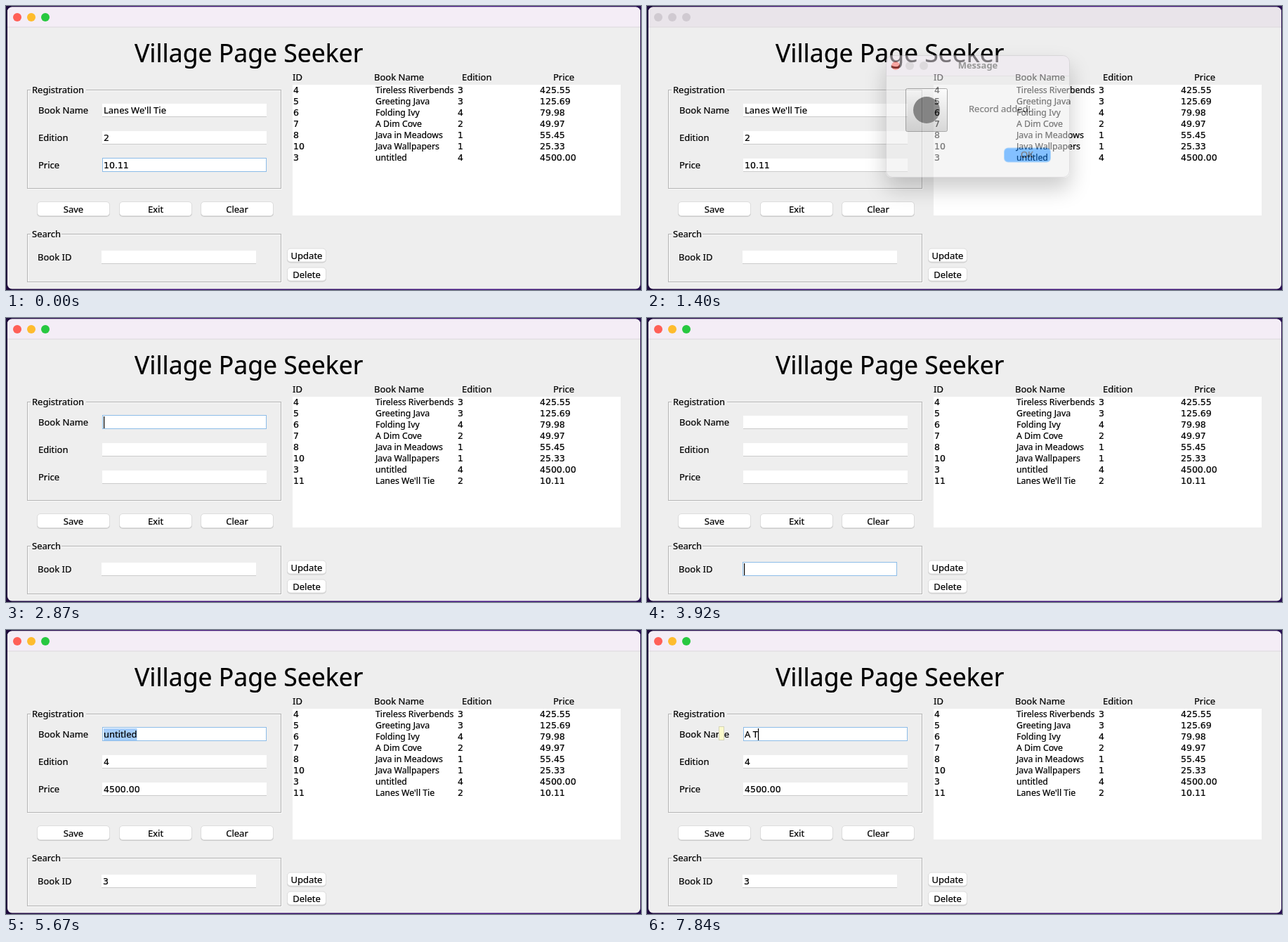
These frames come from a looping animation (904 by 404 pixels, 8000 ms). An HTML page:

```html
<!DOCTYPE html>
<html lang="en">
<head>
<meta charset="utf-8">
<title>Book registration</title>
<style>
  html, body { margin: 0; width: 100%; height: 100%; overflow: hidden; background: #241047; }
  svg { display: block; width: 904px; height: 404px; }
  text { font: 13px "Noto Sans", "Open Sans", sans-serif; white-space: pre; stroke: #000; stroke-width: .22px; }
  .num { font: 12.5px "DejaVu Sans", sans-serif; }
  .cell { font-size: 12.3px; }
  .mid { text-anchor: middle; }
  .title { font-size: 35.5px; }
  .bold { font-weight: bold; fill: #444; stroke: none; }
</style>
</head>
<body>
<svg id="stage" viewBox="0 0 904 404" xmlns="http://www.w3.org/2000/svg"></svg>
<script>
const LOOP = 8000, BLINK = 490;
const NEW_BOOK = "Lanes We'll Tie";
const books = [
  [4, "Tireless Riverbends", 3, "425.55"],
  [5, "Greeting Java", 3, "125.69"],
  [6, "Folding Ivy", 4, "79.98"],
  [7, "A Dim Cove", 2, "49.97"],
  [8, "Java in Meadows", 1, "55.45"],
  [10, "Java Wallpapers", 1, "25.33"],
  [3, "untitled", 4, "4500.00"],
  [11, NEW_BOOK, 2, "10.11"],
];
const fields = {
  name: { x: 137, y: 138, w: 234 },
  edition: { x: 137, y: 177, w: 234 },
  price: { x: 137, y: 216, w: 234 },
  id: { x: 136, y: 347, w: 220 },
};
const lights = ["#ff5f57", "#febc2e", "#28c840"];

// Markup helpers
const text = (x, y, s, cls = "") => `<text x="${x}" y="${y}" class="${cls}">${s}</text>`;
const rect = (x, y, w, h, fill, more = "") =>
  `<rect x="${x}" y="${y}" width="${w}" height="${h}" fill="${fill}" ${more}/>`;
const dot = (x, y, fill, more = "") => `<circle cx="${x}" cy="${y}" r="6" fill="${fill}" ${more}/>`;
const button = (x, y, w, h, label) =>
  rect(x, y + 1, w, h, "#cecece", 'rx="5"') +
  rect(x + .5, y + .5, w - 1, h - 1, "#fff", 'rx="4.5" stroke="#dcdcdc"') +
  text(x + w / 2, y + h / 2 + 5, label, "mid");
const group = (y, h, label, labelWidth) =>
  rect(31.5, y + 1.5, 361, h, "none", 'stroke="#fafafa"') +
  rect(30.5, y + .5, 361, h, "none", 'stroke="#b4b4b4"') +
  rect(35, y - 2, labelWidth, 6, "#eee") + text(37, y + 5, label);
const field = (key, { x, y, w }) =>
  `<g id="${key}">` +
  rect(x, y + 1, w, 18, "#fff") +
  rect(x, y + 19, w, 1, "#cbcbcb") +
  rect(x + .5, y + .5, w - 1, 19, "#fff", 'class="ring" stroke="#8cbce8"') +
  rect(x + 1, y + 2, 0, 17, "#a5cdfb", 'class="sel"') +
  text(x + 2, y + 15, "", key == "name" ? "" : "num") +
  rect(x + 2, y + 2, 1.2, 17, "#000", 'class="caret"') + "</g>";
const row = ([id, name, edition, price], i) => {
  const y = 124 + 16 * i;
  return `<g class="row">${text(409, y, id, "num")}${text(526, y, name, "cell")}` +
    text(643, y, edition, "num") + text(760, y, price, "num") + "</g>";
};
const gradient = (id, dir, ...colors) =>
  `<linearGradient id="${id}" ${dir}>` + colors.map((c, i) =>
    `<stop offset="${i / (colors.length - 1)}" stop-color="${c}"/>`).join("") + "</linearGradient>";

const stage = document.getElementById("stage");
stage.innerHTML =
  "<defs>" +
  gradient("desk", "", "#1d0b3c", "#42127c", "#321064", "#451585", "#281052") +
  gradient("icon", 'x2="0" y2="1"', "#fafafa", "#b0b0b0") +
  '<filter id="shade" x="-30%" y="-30%" width="160%" height="180%">' +
  '<feDropShadow dx="0" dy="16" stdDeviation="15" flood-opacity=".4"/></filter>' +
  '<clipPath id="win"><rect x="2" y="1.5" width="901" height="401" rx="6.5"/></clipPath></defs>' +
  rect(0, 0, 904, 404, "url(#desk)") +
  '<g clip-path="url(#win)">' + rect(2, 1, 901, 402, "#eee") +
  rect(2, 1, 901, 29, "#f4edf6", 'id="bar"') + rect(2, 29.5, 901, 1, "#dedade") + "</g>" +
  lights.map((c, i) => dot(16 + 20 * i, 16, c, 'class="light"')).join("") +
  text(183, 80, "Village Page Seeker", "title") +
  text(408, 106, "ID") + text(524, 106, "Book Name") + text(649, 106, "Edition") + text(779, 106, "Price") +
  rect(408, 112, 467, 186, "#fff") + books.map(row).join("") +
  group(119, 140, "Registration", 79) + group(324, 68, "Search", 44) +
  text(46, 153, "Book Name") + text(46, 192, "Edition") + text(46, 231, "Price") + text(45, 362, "Book ID") +
  Object.entries(fields).map(([key, box]) => field(key, box)).join("") +
  button(44, 278, 104, 21, "Save") + button(161, 278, 104, 21, "Exit") + button(277, 278, 104, 21, "Clear") +
  button(400, 344.5, 56, 20, "Update") + button(400, 371.5, 56, 20, "Delete") +
  rect(102.5, 137.5, 7, 19, "#fbfacb", 'id="tip" stroke="#d5d4b8"') +
  '<g id="dialog">' +
  rect(340, 70, 262, 174, "#ececec", 'rx="9" filter="url(#shade)"') +
  '<path d="M340 99V79a9 9 0 0 1 9-9h244a9 9 0 0 1 9 9v20z" fill="#f1e9f2"/>' +
  rect(340, 99, 262, 1, "#d9d4d9") +
  rect(340.5, 70.5, 261, 173, "none", 'rx="9" stroke="#c2bfc3"') +
  dot(354, 85, lights[0]) + dot(374, 85, "#cdc7ce") + dot(394, 85, "#cdc7ce") +
  text(471, 89, "Message", "bold mid") +
  rect(368.5, 117.5, 59, 61, "url(#icon)", 'rx="2" stroke="#555"') +
  '<circle cx="398" cy="148" r="19" fill="#1c1c1c"/>' +
  text(458, 151, "Record added!") +
  rect(508, 201.5, 67, 21, "#62aef6", 'rx="6"') +
  rect(509, 202.5, 65, 19, "#0a83ff", 'rx="5" id="ok"') +
  text(541, 216, "OK", "mid") + "</g>";

// Each event changes part of the state; `key` restarts the caret blink.
const events = [
  [0, { name: NEW_BOOK, edition: "2", price: "10.11", id: "", focus: "price", rows: 7,
        active: true, dialog: 0, zoom: 1, pressed: false, sel: 0, tip: false, key: -BLINK }],
  [70, { active: false, focus: "", dialog: .5, zoom: .93 }],
  [140, { dialog: .85, zoom: .98 }],
  [210, { dialog: 1, zoom: 1 }],
  [1190, { pressed: true }],
  [1400, { dialog: .5, pressed: false }],
  [1470, { dialog: 0, name: "", edition: "", price: "", rows: 8 }],
  [1540, { active: true, focus: "name", key: 1540 }],
  [3920, { focus: "id", key: 3920 }],
  [4830, { id: "3", key: 4830 }],
  [5320, { name: "untitled", edition: "4", price: "4500.00" }],
  [5390, { focus: "name", key: 5390 }],
  [5530, { sel: .35 }],
  [5600, { sel: .75 }],
  [5670, { sel: 1 }],
  [6860, { tip: true }],
  [7210, { name: "A", sel: 0, key: 7210 }],
  [7350, { name: "A ", key: 7350 }],
  [7560, { name: "A T", key: 7560 }],
];

const $ = id => document.getElementById(id);
const show = (el, on) => el.setAttribute("visibility", on ? "visible" : "hidden");
const set = (el, attrs) => { for (const k in attrs) el.setAttribute(k, attrs[k]); };

function drawField(key, s, t) {
  const el = $(key), { x } = fields[key], label = el.querySelector("text");
  const focused = s.focus == key;
  label.textContent = s[key];
  const width = s[key] ? label.getComputedTextLength() : 0;
  const sel = key == "name" ? s.sel : 0;
  const blinkOn = Math.floor((t - s.key) / BLINK) % 2 == 0;
  set(el.querySelector(".sel"), { x: x + 2 + width * (1 - sel), width: width * sel });
  set(el.querySelector(".caret"), { x: x + 2 + width });
  show(el.querySelector(".ring"), focused);
  show(el.querySelector(".caret"), focused && !sel && blinkOn);
}

function draw(t) {
  const s = Object.assign({}, ...events.filter(e => e[0] <= t).map(e => e[1]));
  for (const key in fields) drawField(key, s, t);
  document.querySelectorAll(".row").forEach((el, i) => show(el, i < s.rows));
  document.querySelectorAll(".light").forEach((el, i) =>
    set(el, { fill: s.active ? lights[i] : "#d0cad1" }));
  set($("bar"), { fill: s.active ? "#f4edf6" : "#e9e4ea" });
  set($("ok"), { fill: s.pressed ? "#0674e6" : "#0a83ff" });
  set($("dialog"), {
    opacity: s.dialog,
    transform: `translate(471 157) scale(${s.zoom}) translate(-471 -157)`,
  });
  show($("tip"), s.tip);
}

const start = performance.now();
function tick() {
  draw((performance.now() - start) % LOOP);
  requestAnimationFrame(tick);
}
tick();
</script>
</body>
</html>
```
